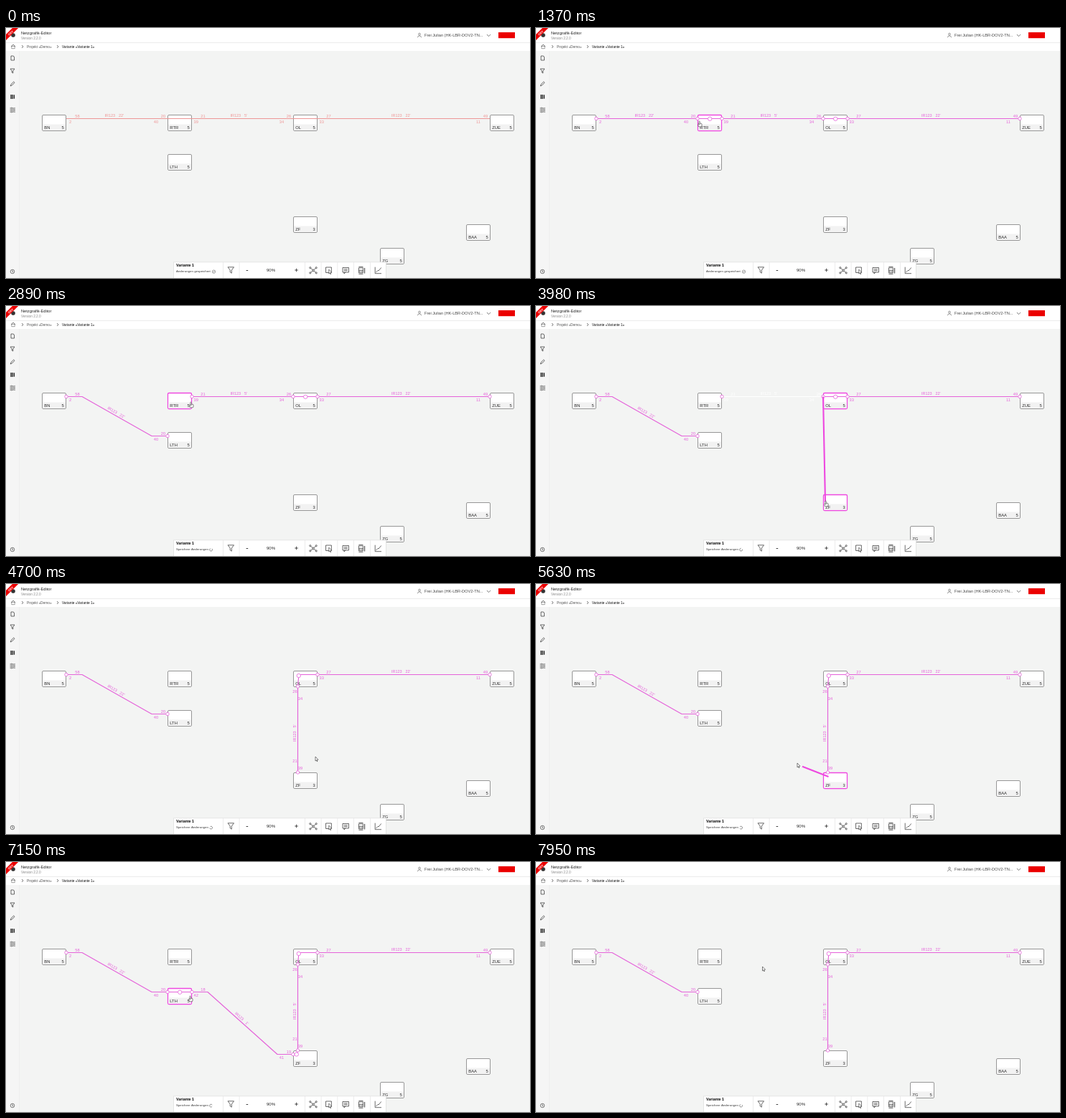
Write an HTML page with a canvas that moves like this. It is 730 px wide and 349 px high and loops after 8 s.

```html
<!DOCTYPE html>
<html lang="de">
<head>
<meta charset="utf-8">
<title>Netzgrafik-Editor</title>
<style>
html, body { margin: 0; width: 100%; height: 100%; overflow: hidden; background: #f3f4f3; }
canvas { display: block; width: 730px; height: 349px; }
</style>
</head>
<body>
<canvas id="stage"></canvas>
<script>
const W = 730, H = 349, LOOP = 8000;
const PINK = '#e562da', HOT = '#ee48e0', FAINT = '#ee9696', INK = '#2a2a2a', RED = '#eb0000';
const FONT = '"Liberation Sans", Arial, sans-serif';
const canvas = document.getElementById('stage');
const c = canvas.getContext('2d');
const dpr = window.devicePixelRatio || 1;
canvas.width = W * dpr;
canvas.height = H * dpr;

const SELECT = 570, UNDO = 7600;

const node = (x, y, n = 5) => ({
  x, y, n,
  left: [x, y + 5.5], right: [x + 34, y + 5.5],
  top: [x + 6.5, y], bottom: [x + 6.5, y + 22],
  at: (dx, dy) => [x + dx, y + dy]
});
const nodes = {
  BN: node(50, 121), RTR: node(225, 121), OL: node(400, 121), ZUE: node(674, 121),
  LTH: node(225, 176), ZF: node(400, 263, 3), BAA: node(641, 274), ZG: node(521, 307)
};
const { BN, RTR, OL, ZUE, LTH, ZF } = nodes;

const drags = [
  { grab: 1560, drop: 2060, node: BN, from: BN.right },
  { grab: 3190, drop: 4150, node: OL, from: OL.left },
  { grab: 5400, drop: 6400, node: ZF, from: ZF.at(7.5, 6) }
];

// Where the pointer rests: arrival, departure, place
const stops = [
  [90, 90, [190, 162]],
  [500, 980, [190, 127]],
  [1370, 1560, RTR.at(2, 9)],
  [2000, 2370, LTH.at(4, 7)],
  [2890, 3190, RTR.at(32, 13)],
  [3850, 4300, ZF.at(3, 9)],
  [4750, 4750, [432, 240]],
  [5300, 5400, ZF.at(7, 4)],
  [5630, 5630, [364, 250]],
  [6300, 6540, LTH.at(5, 8)],
  [7000, 7440, LTH.at(31, 11)],
  [7900, LOOP, [315.5, 146]]
];

function pointer(t) {
  const i = stops.findIndex(s => t <= s[1]);
  const [arrive, , to] = stops[i];
  if (i === 0 || t >= arrive) return to;
  const [, leave, from] = stops[i - 1];
  const u = (t - leave) / (arrive - leave), e = u * u * (3 - 2 * u);
  return from.map((v, k) => v + (to[k] - v) * e);
}

function text(s, x, y, size, color = INK, align = 'left', weight = '') {
  c.font = `${weight} ${size}px ${FONT}`;
  c.textAlign = align;
  c.fillStyle = color;
  c.fillText(s, x, y);
}

function paint(color, width, fill) {
  if (fill) {
    c.fillStyle = fill;
    c.fill();
  }
  c.strokeStyle = color;
  c.lineWidth = width;
  c.stroke();
}

function line(points, color = INK, width = 0.7, fill) {
  c.beginPath();
  points.forEach(([x, y]) => c.lineTo(x, y));
  if (fill) c.closePath();
  paint(color, width, fill);
}

function box(x, y, w, h, radius = 0, color = INK, width = 0.7, fill) {
  c.beginPath();
  c.roundRect(x, y, w, h, radius);
  paint(color, width, fill);
}

function ring(x, y, r, color = INK, width = 0.6, fill) {
  c.beginPath();
  c.arc(x, y, r, 0, 7);
  paint(color, width, fill);
}

function rect(x, y, w, h, color = INK) {
  c.fillStyle = color;
  c.fillRect(x, y, w, h);
}

const hline = (x, y, w) => line([[x, y], [x + w, y]]);
const port = ([x, y]) => ring(x, y, 2.2, PINK, 0.8, '#fff');
const transit = ([x, y]) => ring(x, y, 2.7, PINK, 0.8, '#fff');

function drawNode(name, hot) {
  const { x, y, n } = nodes[name];
  box(x + 0.5, y + 0.5, 33, 22, 1.5, hot ? HOT : '#8c8c8c', hot ? 1.3 : 0.9, '#fff');
  rect(x + 1.2, y + 13.5, 31.6, 8.2, '#f2f2f2');
  text(name, x + 3.3, y + 20, 5.8);
  text(n, x + 27.6, y + 20, 5.8);
}

// Train name and running time, centred on the run from a to b
function trainLabel(a, b, dep, arr, color) {
  c.save();
  c.translate((a[0] + b[0]) / 2, (a[1] + b[1]) / 2);
  c.rotate(Math.atan2(b[1] - a[1], b[0] - a[0]));
  text('IR123', -17, -2.4, 5.5, color);
  text((arr - dep + 60) % 60 + "'", 2.5, -2.4, 5.5, color);
  c.restore();
}

// The opposite direction mirrors each minute around the full hour
function minutes(n, x, y, dx, dy, color) {
  text(n, x, y, 5.7, color, 'center');
  text(60 - n, x + dx, y + dy, 5.7, color, 'center');
}

function section(a, b, dep, arr, color = PINK) {
  const p = [a[0] + 22, a[1]], q = [b[0] - 22, b[1]];
  line([a, p, q, b], color, 1.15);
  trainLabel(p, q, dep, arr, color);
  minutes(dep, a[0] + 15.5, a[1] - 2, -9.8, 8.4, color);
  minutes(arr, b[0] - 6, b[1] - 2, -10, 8.4, color);
}

function upright(a, b, dep, arr) {
  line([a, b], PINK, 1.15);
  trainLabel(a, b, dep, arr, PINK);
  minutes(dep, a[0] - 4.1, a[1] - 14, 7.6, 10, PINK);
  minutes(arr, b[0] - 4.1, b[1] + 9, 7.6, 9.5, PINK);
}

function drawNetwork(t, [x, y]) {
  const on = t >= SELECT, color = on ? PINK : FAINT;
  const [moved1, moved2, dropped] = drags.map(d => t >= d.drop);
  const linked = dropped && t < UNDO;
  const drag = drags.find(d => t >= d.grab && t < d.drop);
  const shade = d => drag === d ? '#fff' : color;

  let over = false;
  for (const name in nodes) {
    const n = nodes[name];
    const inside = on && Math.abs(x - n.x - 17) < 19 && Math.abs(y - n.y - 11) < 13;
    over = over || inside;
    drawNode(name, inside || drag && drag.node === n);
  }

  const passing = [!moved1 && RTR, !moved2 && OL, linked && LTH].filter(Boolean);
  passing.forEach(n => line([n.left, n.right], color, 1.15));
  const ports = [BN.right, OL.right, ZUE.left, moved1 ? LTH.left : RTR.left];

  section(BN.right, ports[3], 58, 20, shade(drags[0]));
  section(OL.right, ZUE.left, 27, 49, color);
  if (moved2) {
    line([OL.right, OL.at(8, 5.5), OL.bottom], PINK, 1.1);
    upright(ZF.top, OL.bottom, 21, 26);
    ports.push(OL.bottom, ZF.top);
  } else {
    section(RTR.right, OL.left, 21, 26, shade(drags[1]));
    ports.push(RTR.right, OL.left);
  }
  if (linked) {
    section(LTH.right, ZF.left, 18, 19);
    line([ZF.left, ZF.at(5, 5.5), ZF.top], PINK, 1.1);
    ports.push(LTH.right, ZF.left);
  }

  if (on) {
    ports.forEach(port);
    passing.forEach(n => transit(n.at(17.2, 5.8)));
    if (moved2) transit(OL.at(7.8, 7));
    if (linked) transit(ZF.at(4.8, 5.5));
  }

  // The rubber band trails the pointer slightly
  if (drag) {
    const [ex, ey] = pointer(t - 60);
    line([drag.from, [ex, ey + 2]], HOT, 2.1);
  }
  return over;
}

function funnel(x, y, s) {
  line([[x - s, y - s], [x + s, y - s], [x + s / 4, y], [x + s / 4, y + s],
    [x - s / 4, y + s * 0.7], [x - s / 4, y], [x - s, y - s]]);
}

function chevron(x, y, turn = 0, s = 2) {
  c.save();
  c.translate(x, y);
  c.rotate(turn);
  line([[-s / 2, -s], [s / 2, 0], [-s / 2, s]], '#444');
  c.restore();
}

function drawHeader() {
  rect(0, 0, W, 32, '#fff');
  rect(0, 20, W, 0.7, '#e2e2e2');
  ring(10, 10, 2.6, '#333', 0.5, '#333');
  line([[0, 9], [9, 0], [17, 0], [0, 17]], RED, 0.2, RED);
  c.save();
  c.translate(6.8, 7.2);
  c.rotate(-Math.PI / 4);
  text('DEV', 0, 1, 4, '#fff', 'center', 'bold');
  c.restore();

  text('Netzgrafik-Editor', 21, 9, 5.7, '#222');
  text('Version 2.2.0', 21, 16, 4.75, '#888');
  ring(576, 8.6, 1.4, '#555');
  c.beginPath();
  c.arc(576, 13.3, 2.5, Math.PI, 0);
  paint('#555', 0.6);
  text('Frei Julian (HK-LBR-DOV2-TN...', 583, 12, 5.65, '#444');
  chevron(672.5, 10.3, Math.PI / 2, 2.6);
  rect(686, 6, 23, 8.2, RED);

  chevron(10, 24.5, -Math.PI / 2, 3);
  box(7.8, 25.5, 4.4, 3.2, 0, '#666', 0.6);
  chevron(23, 26);
  text('Projekt «Demo»', 29, 28, 4.85, '#555');
  chevron(72, 26);
  text('Variante «Variante 1»', 78, 28, 4.75, '#111');
}

function drawSidebar() {
  rect(0, 32, 18.5, H, '#f5f5f5');
  rect(18.3, 32, 0.6, H, '#e9e9e9');
  box(7, 39, 4.5, 6, [0, 2, 0, 0]);
  funnel(9, 60, 3);
  line([[6.2, 81], [7, 78.6], [10.7, 75], [12, 76.3], [8.4, 80], [6.2, 81]]);
  rect(10.6, 93.3, 1.5, 5.4);
  for (let i = 0; i < 3; i++) {
    rect(6, 93.3 + i * 2, 4, 1.4);
    hline(5.5, 112 + i * 2.5, 7.5);
    ring(i === 1 ? 10.7 : 7.7, 112 + i * 2.5, 0.9, INK, 0.5, '#fff');
  }
  ring(9, 340, 2.8);
  line([[9, 338.3], [9, 340.3], [10.2, 341]]);
}

function drawToolbar(t) {
  const slot = i => 427.5 + i * 22.75;
  box(233.5, 326.8, 296, 24, 0, '#dcdcdc', 0.7, '#fff');
  [302, 324.7].forEach(x => rect(x, 327, 0.7, 22, '#e4e4e4'));
  for (let i = 0; i < 5; i++) rect(slot(i) - 11.5, 327, 0.7, 22, '#e4e4e4');

  const saved = t < drags[0].drop;
  text('Variante 1', 237, 333.3, 5.25, '#000', 'left', 'bold');
  text(saved ? 'Änderungen gespeichert' : 'Speichere Änderungen', 237, 341.4, 4.4, '#333');
  if (saved) {
    ring(289.5, 340.2, 2.2, '#444', 0.5);
    line([[288.4, 340.2], [289.2, 341], [290.6, 339.3]], '#444', 0.5);
  } else {
    c.beginPath();
    c.arc(285.6, 340.2, 1.9, t / 160, t / 160 + 5);
    paint('#444', 0.6);
  }

  funnel(313.3, 338, 4.2);
  rect(334.6, 338, 2.6, 0.9);
  text('90%', 369, 340, 6.1, INK, 'center');
  rect(402.3, 337.6, 4.6, 0.8);
  rect(404.2, 335.7, 0.8, 4.6);

  // Net
  const net = slot(0) + 0.5;
  for (const sx of [-1, 1]) for (const sy of [-1, 1]) {
    const x = net + sx * 4.2, y = 338.3 + sy * 3.6;
    line([[net, 338.3], [x, y]]);
    ring(x, y, 1.1, INK, 0.7, '#fff');
  }
  ring(net, 338.3, 1.3, INK, 0.7, '#fff');

  // Selection
  box(slot(1) - 4.7, 334, 7.8, 7.5);
  drawArrow(slot(1) - 0.5, 337);

  // Note
  box(slot(2) - 4, 334.5, 8.5, 6.5);
  for (const y of [336.8, 338.7]) hline(slot(2) - 2.3, y, 5.1);
  line([[slot(2) - 2, 341], [slot(2) - 2, 343], [slot(2), 341]]);

  // Train
  const train = slot(3) - 4.3;
  box(train, 334.8, 6, 7);
  for (const y of [333.3, 338.3, 343.4]) hline(train, y, 6);
  for (const x of [1, 3.7]) rect(train + x, 339.5, 1.2, 1.2);
  line([[train + 8.2, 335], [train + 8.2, 342.5]], INK, 0.9);

  // Chart
  const x = slot(4) - 4.3;
  line([[x, 333.7], [x, 342.7], [x + 8.8, 342.7]]);
  line([[x + 1.3, 341], [x + 3.8, 338.5], [x + 5.3, 338.5], [x + 8.5, 334.5]]);
}

function drawArrow(x, y) {
  line([[x, y], [x, y + 6], [x + 1.4, y + 4.7], [x + 2.6, y + 7], [x + 2.5, y + 4.4], [x + 4, y + 4.2]], INK, 0.6, '#fff');
}

function drawHand(x, y) {
  box(x - 1, y + 3.2, 5, 4.6, 1.3, INK, 0.6, '#fff');
  box(x - 0.1, y, 1.4, 5, 0.7, INK, 0.5, '#fff');
}

function draw(t) {
  c.setTransform(dpr, 0, 0, dpr, 0, 0);
  c.lineJoin = 'round';
  rect(0, 0, W, H, '#f3f4f3');
  const tip = pointer(t);
  const over = drawNetwork(t, tip);
  drawHeader();
  drawSidebar();
  drawToolbar(t);
  if (t >= stops[0][0]) (over ? drawHand : drawArrow)(...tip);
}

const start = performance.now();
function tick() {
  draw((performance.now() - start) % LOOP);
  requestAnimationFrame(tick);
}
tick();
</script>
</body>
</html>
```
